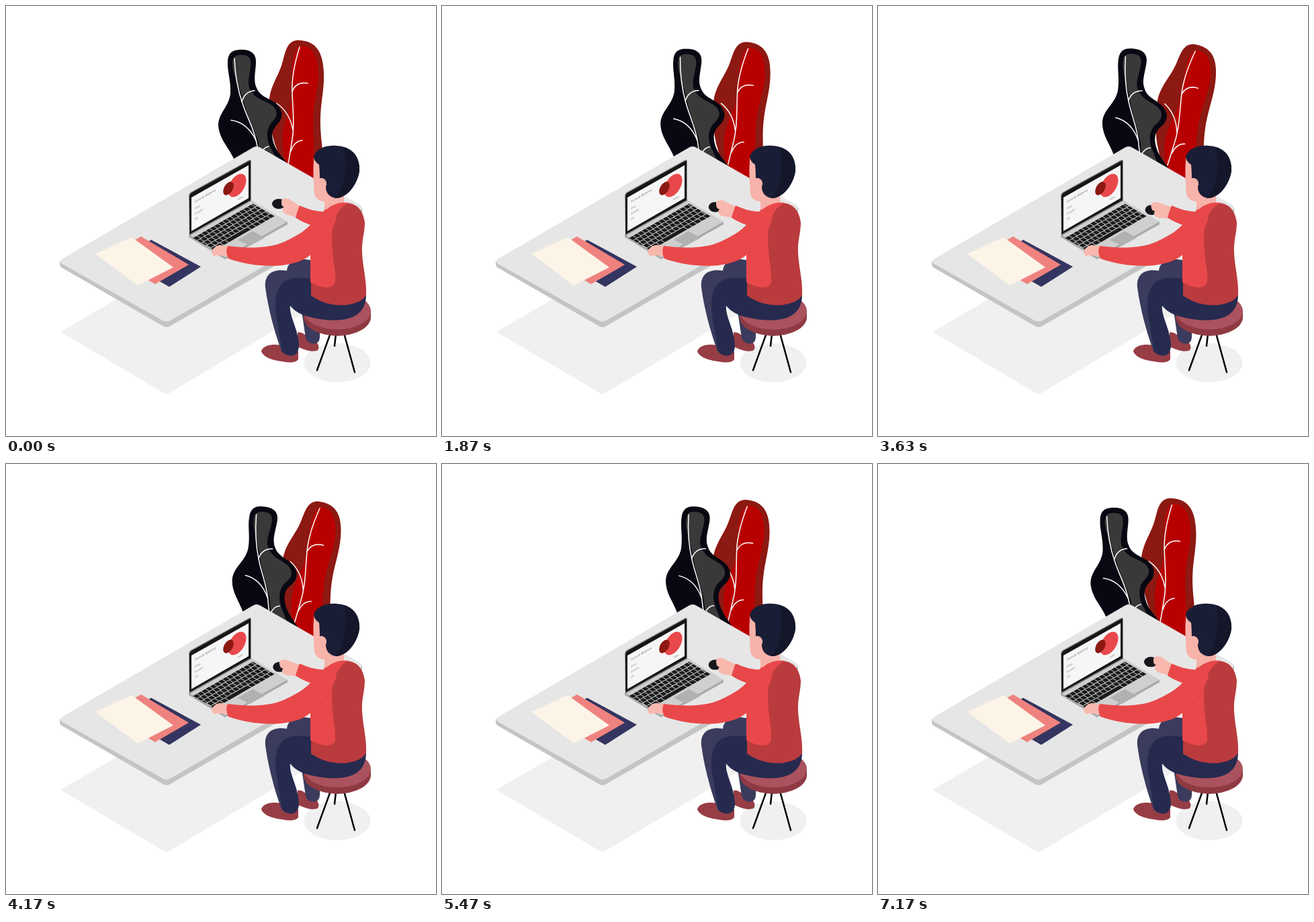
Write an HTML page that moves like this. It is 640x640 px and loops after 7210 ms.

```html
<!DOCTYPE html>
<html lang="en">
<head>
<meta charset="utf-8">
<title>Desk worker</title>
<style>
  html, body { margin: 0; width: 100%; height: 100%; overflow: hidden; background: #fff; }
  svg { display: block; width: 100%; height: 100%; }
  text { font-family: "Open Sans", sans-serif; fill: #777; }
  .vein { fill: none; stroke: #fff; stroke-width: 1.5; stroke-linecap: round; }
  .keys { fill: none; stroke: #1b1b1b; stroke-width: 17; }
</style>
</head>
<body>
<svg viewBox="0 0 640 640">
  <!-- shadows -->
  <path fill="#f0f0f0" d="M81 485L373 315L530 405L243 576Q239 578 235 576Z"/>
  <ellipse cx="493" cy="531" rx="49.500" ry="29" fill="#f0f0f0"/>

  <!-- leaves -->
  <g id="red">
    <path fill="#8c1912" d="M475 270C473 215 467 195 468 165C469 140 474 122 473 100C472 72 464 51 434 51C418 52 416 68 412 82C407 102 395 116 392 137C390 160 393 180 400 205L424 270Z"/>
    <path fill="#b90000" d="M440 59C458 60 464 76 465 100C465 122 458 143 457 168C457 195 460 220 457 260H424C413 222 409 203 413 184C416 165 425 152 426 130C427 107 422 62 440 59Z"/>
    <g class="vein">
      <path d="M437 61C427 93 425 113 426 130C427 158 430 180 425 205C423 217 422 224 420 235"/>
      <path d="M426 127Q432 112 449 115M403 145Q422 158 427 184M424 216Q429 201 441 200"/>
    </g>
  </g>
  <g id="black">
    <path fill="#070812" d="M346 250C340 214 318 205 316 178C316 159 332 150 334 130C335 111 329 97 330 82C331 66 342 65 351 65C366 65 373 72 372 85C371 101 368 112 373 122C379 137 395 137 405 148C415 160 410 170 402 178C393 188 396 201 403 214C410 226 422 235 430 250Z"/>
    <path fill="#393939" d="M337 86C337 75 343 72 352 73C363 73 365 80 364 90C362 107 358 117 365 127C374 142 392 141 400 152C406 161 401 168 394 175C386 186 388 201 395 213L412 245H384L375 200C367 178 357 158 352 137C346 116 337 101 337 86Z"/>
    <g class="vein">
      <path d="M340 78C341 105 345 125 352 145C359 167 370 183 374 209L379 230"/>
      <path d="M351 143Q355 127 370 126M335 170Q359 173 372 200M379 221Q383 210 391 209"/>
    </g>
  </g>

  <!-- desk -->
  <path fill="#c4c4c4" d="M80 380V385Q80 388 84 390L233 476Q239 480 245 476L530 312V300Z"/>
  <path fill="#e6e6e6" d="M84 376L367 211Q373 207 379 211L527 296Q532 300 527 304L245 468Q239 471 233 468L84 384Q77 380 84 376Z"/>
  <path fill="#343560" d="M216 348L290 388L243 418L170 376Z"/>
  <path fill="#ef827e" d="M201 343L272 385L222 414L150 372Z"/>
  <path fill="#fdf4e8" d="M133 369L187 344L249 389L196 416Z"/>

  <!-- laptop -->
  <path fill="#a9a9a9" d="M272 340V344L326 377L419 325V321Z"/>
  <path fill="#cfcfcf" d="M272 340L364 288L419 321L326 374Z"/>
  <g id="keys" transform="matrix(.89 -.51 .33 .19 278 345)"></g>
  <path fill="#b1b1b1" d="M345 348L367 335L385 345L363 357Z"/>
  <path fill="#8c8c8c" d="M272 282Q272 279 275 277L362 229Q365 228 365 231V290L273 342Z"/>
  <path fill="#161616" d="M273 283Q273 280 276 278L361 231Q364 229 364 232V289L273 340Z"/>
  <path fill="#f6f6f6" d="M276 285L361 237V286L276 335Z"/>
  <g transform="matrix(.87 -.5 0 1 344 267)"><circle r="15.500" fill="#e9484a"/></g>
  <g transform="matrix(.87 -.5 0 1 331 271.500)"><circle r="9" fill="#8c1912"/></g>
  <g transform="matrix(.87 -.5 0 1 281 293)" font-size="5">
    <text>Annual Balance</text>
    <g font-size="4">
      <text y="10">Data</text>
      <text y="18">Growth</text>
      <text y="26">2%</text>
      <text x="73" y="33">Sales</text>
    </g>
  </g>

  <!-- far leg -->
  <path fill="#973d45" d="M434 486C444 484 448 495 463 501Q468 509 463 513C453 516 441 510 434 507Z"/>
  <path fill="#3a3b5d" d="M440 454L462 462C466 476 469 488 466 498C460 507 448 502 446 494Z"/>

  <!-- stool -->
  <path fill="none" stroke="#000" stroke-width="2.500" stroke-linecap="round" d="M483 487L463 542M491 488L489 506M503 487L519 545"/>
  <path fill="#8f3a43" d="M443 454V463A50 28 0 0 0 543 463V454Z"/>
  <ellipse cx="493" cy="454" rx="50" ry="27.500" fill="#aa525e"/>

  <!-- near leg -->
  <path fill="#973d45" d="M380 514C382 505 396 502 410 505L435 514V526C430 533 416 530 404 528C393 526 382 521 380 514Z"/>
  <path fill="#3a3b5d" d="M418 394C419 381 431 374 453 378V425L421 440L428 515Q419 524 410 514C400 485 391 455 386 419C384 397 400 391 418 394Z"/>
  <path fill="#272a4f" d="M455 406C437 403 420 404 411 413C400 425 400 444 402 460L411 514Q418 522 428 520Q436 517 436 505C435 480 421 461 423 446C434 460 452 464 475 467C506 470 535 464 536 431L510 410Z"/>

  <!-- mouse and far hand -->
  <ellipse id="mouse" cx="406" cy="294.500" rx="10" ry="7.500" fill="#15161b"/>
  <path id="hand" fill="#f8b8ae" d="M410 292C409 286 418 284 424 289L444 302L436 317C428 312 421 312 417 310C410 306 411 302 414 299C410 298 410 295 410 292Z"/>

  <!-- torso and arms -->
  <path fill="#f7b2aa" d="M459 222C456 245 458 262 459 279Q461 290 474 291V305L503 300V250Z"/>
  <path fill="#e9484a" d="M437 297C448 302 461 306 472 306L466 330C453 326 441 322 431 315Q434 304 437 297Z"/>
  <path fill="#ba3b3d" d="M497 294C518 290 531 300 534 322C534 338 529 350 530 367C531 390 537 407 536 430C528 446 486 454 454 431V340Z"/>
  <path fill="#e9484a" d="M476 304C484 296 497 291 510 293C493 300 485 322 485 345C485 373 491 392 490 411C486 424 467 419 453 411V360Z"/>
  <path fill="#f8b8ae" d="M306 367C307 360 315 355 322 356L334 358V374L321 371L309 372Z"/>
  <path fill="#e9484a" d="M330 357C358 361 392 361 414 351C434 342 449 332 456 322L476 302L492 315C486 337 472 355 456 368C432 392 374 391 331 376Q326 366 330 357Z"/>
  <path fill="none" stroke="#d74043" stroke-width="1" d="M456 368Q472 357 481 343"/>

  <!-- head -->
  <path fill="#1a1d36" d="M458 224C463 210 480 207 492 208C516 209 527 227 526 245C524 264 508 287 490 286C481 284 476 278 476 269L467 257Q467 246 466 236Q459 232 458 224Z"/>
  <path fill="#141729" d="M503 210C521 215 527 230 526 246C523 265 507 287 490 286C505 270 508 238 503 210Z"/>
  <path fill="#f7b2aa" d="M465 258C470 253 478 258 477 266Q475 273 468 271Z"/>
</svg>
<script>
  const LOOP = 7210;
  const byId = id => document.getElementById(id);
  const turn = (id, deg, x, y) => byId(id).setAttribute('transform', `rotate(${deg} ${x} ${y})`);

  // Rises linearly from 0 to 1 at the peak time, then falls back to 0.
  const sway = (t, peak) => t < peak ? t / peak : (LOOP - t) / (LOOP - peak);

  // Each dash of a thick line is one key.
  const dashes = ['6 1', '6 1', '6 1', '6 1', '7 1 7 1 7 1 37 1 7 1 7 1 7 1'];
  byId('keys').innerHTML = dashes.map((dash, row) =>
    `<path class="keys" d="M0 ${10 + row * 20}H100" stroke-dasharray="${dash}" stroke-dashoffset="${row % 4 * 2}"/>`
  ).join('');

  function draw(now) {
    const t = now % LOOP;
    const s = sway(t, 3600);
    turn('red', 8.2 * s, 411, 312);
    turn('black', 8 * sway(t, 4800), 380, 345);
    turn('hand', -13 * s, 440, 310);
    byId('mouse').setAttribute('transform', `translate(${1.5 * s} ${9 * s})`);
    requestAnimationFrame(draw);
  }
  draw(0);
</script>
</body>
</html>
```
